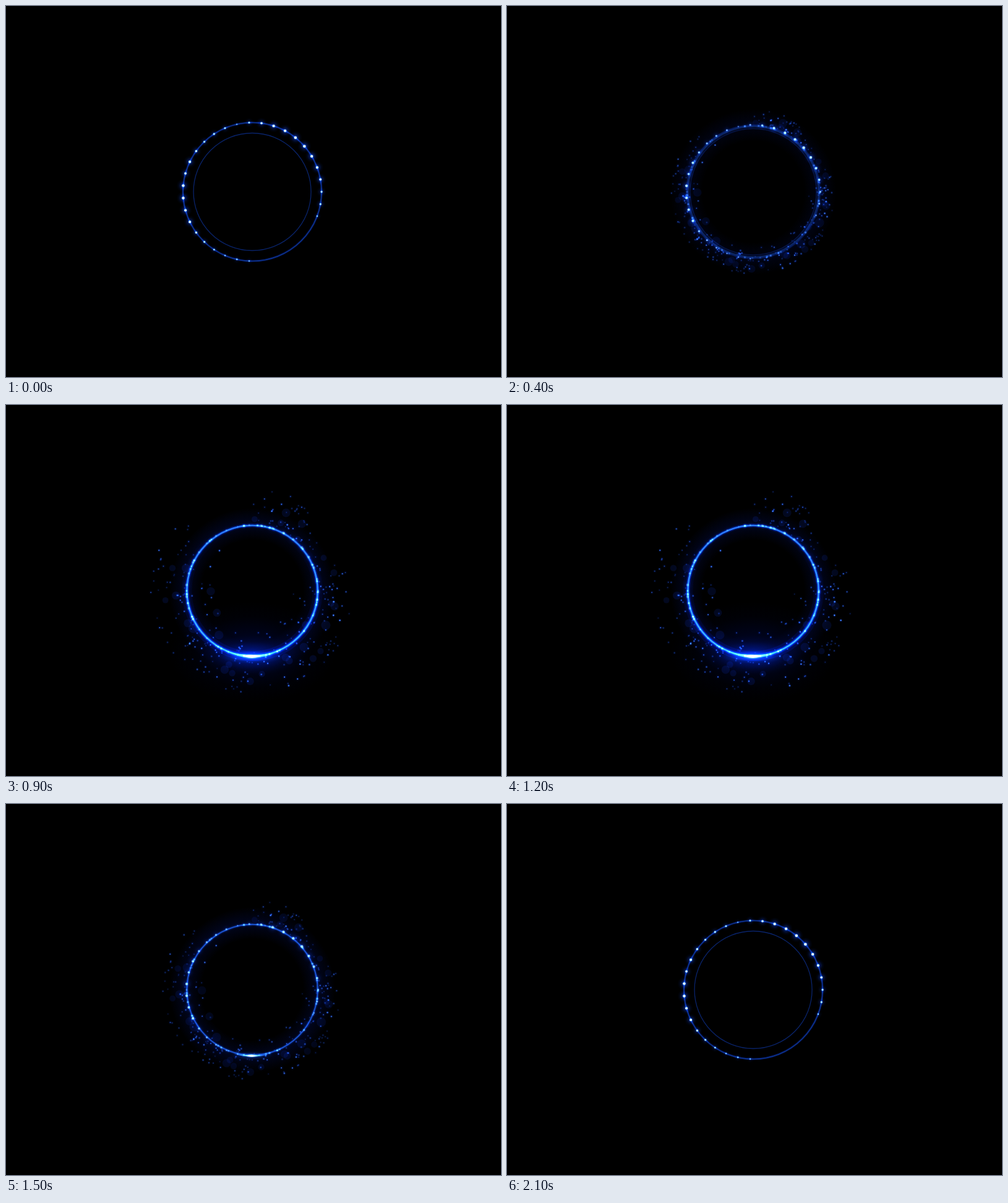
Write an HTML page with a canvas that moves like this. It is 800 px wide and 600 px high and loops after 2200 ms.

```html
<!DOCTYPE html>
<html lang="en">
<head>
<meta charset="utf-8">
<title>Particle ring</title>
<style>
  html, body { margin: 0; width: 100%; height: 100%; overflow: hidden; background: #000; }
  canvas { display: block; width: 800px; height: 600px; }
</style>
</head>
<body>
<canvas id="stage" width="800" height="600"></canvas>
<script>
const ctx = document.getElementById('stage').getContext('2d');
const CX = 398, CY = 300.5, RADIUS = 105.7, TAU = Math.PI * 2;
const STEP = 100, STEPS = 22, TOP_LEVEL = 9;

let seed = 41;
const random = () => (seed = (seed * 16807) % 2147483647) / 2147483647;
const between = (a, b) => mix(a, b, random());
const times = (n, make) => Array.from({ length: n }, (_, i) => make(i));
const clamp = v => Math.max(0, Math.min(1, v));
const mix = (a, b, t) => a + (b - a) * t;
const rgba = (rgb, a) => `rgba(${rgb},${a})`;

// Angles run clockwise from the top, in degrees
function polar(deg, r) {
  const a = deg * TAU / 360;
  return [CX + Math.sin(a) * r, CY - Math.cos(a) * r];
}

// Evenly spaced stars, brightest at the upper right and on the left
const STARS = times(35, k => ({
  deg: -2.6 + k * 360 / 35,
  power: .5 + .4 * Math.cos((k - 4.5) * TAU / 22) + between(-.12, .12)
})).filter(star => star.power > .2);

const SPARKS = times(40, () => ({ deg: between(0, 360), power: between(.4, 1) }));

// Particles gather in loose clumps around the ring
const CLUMPS = [28, 95, 138, 185, 230, 282];
function particle(i) {
  const deg = CLUMPS[i % CLUMPS.length] + (random() + random() - 1) * 40;
  const inward = deg > 65 && random() < .2;
  const reach = random() ** 1.3;
  return {
    deg,
    end: inward ? 102 - reach * 36 : 109 + reach * 56,
    power: .2 + .8 * random() ** 2,
    size: between(.8, 1.4)
  };
}
const DUST = times(270, particle);
const DISCS = times(30, particle);

function spot(x, y, r, rgb, alpha) {
  const g = ctx.createRadialGradient(x, y, 0, x, y, r);
  g.addColorStop(0, rgba(rgb, alpha));
  g.addColorStop(.4, rgba(rgb, alpha * .45));
  g.addColorStop(.7, rgba(rgb, alpha * .12));
  g.addColorStop(1, rgba(rgb, 0));
  ctx.fillStyle = g;
  ctx.fillRect(x - r, y - r, r * 2, r * 2);
}

function oval(x, y, rx, ry, rgb, alpha) {
  ctx.save();
  ctx.translate(x, y);
  ctx.scale(1, ry / rx);
  spot(0, 0, rx, rgb, alpha);
  ctx.restore();
}

function dot(x, y, r, color) {
  ctx.fillStyle = color;
  ctx.beginPath();
  ctx.arc(x, y, r, 0, TAU);
  ctx.fill();
}

function ring(r, width, style) {
  ctx.lineWidth = width;
  ctx.strokeStyle = style;
  ctx.beginPath();
  ctx.arc(CX, CY, r, 0, TAU);
  ctx.stroke();
}

// Soft band around the ring, fading to both sides
function haze(r, width, rgb, alpha) {
  const g = ctx.createRadialGradient(CX, CY, r - width, CX, CY, r + width);
  g.addColorStop(0, rgba(rgb, 0));
  g.addColorStop(.5, rgba(rgb, alpha));
  g.addColorStop(1, rgba(rgb, 0));
  dot(CX, CY, r + width, g);
}

function vertical(rgb, top, bottom) {
  const g = ctx.createLinearGradient(0, CY - RADIUS, 0, CY + RADIUS);
  g.addColorStop(0, rgba(rgb, top));
  g.addColorStop(.5, rgba(rgb, mix(top, bottom, .4)));
  g.addColorStop(1, rgba(rgb, bottom));
  return g;
}

function drawRings(merge, glow) {
  const apart = 1 - merge;
  ring(mix(112, RADIUS, merge), 4, rgba('4,24,110', .35 * apart));
  ring(mix(112, RADIUS, merge), 1.6, rgba('16,64,165', .7 * apart));
  ring(mix(95, RADIUS, merge), 1.3, rgba('12,48,150', .7 * mix(apart, 1, .3)));
  ring(RADIUS, 5, rgba('5,26,85', .5 * merge));
  ring(RADIUS, 2, rgba('30,82,160', .7 * merge ** 2));

  haze(108, 26, '2,10,60', .5 * merge);
  ring(RADIUS, 16, vertical('0,20,170', 0, .25 * glow));
  ring(RADIUS, 8, vertical('0,40,210', .1 * glow, .35 * glow));
  ring(RADIUS, 4.5, vertical('5,60,220', .25 * glow, .6 * glow));
  ring(RADIUS, 2.2, vertical('50,100,170', .35 * glow, .9 * glow));
}

function drawStars(merge, glow) {
  const fade = mix(1, .55, merge) * (1 - glow * .7);
  for (const { deg, power } of STARS) {
    const [x, y] = polar(deg, mix(112, 106.5, merge));
    spot(x, y, 5 + power * 6, '10,55,200', power * .75 * fade);
    spot(x, y, 2 + power * 2, '90,165,255', mix(.5, 1, power) * fade);
    dot(x, y, .6 + power * 1.5, rgba('205,232,255', mix(.2, 1, power) * fade));
  }
}

function drawSparks(merge, glow) {
  for (const { deg, power } of SPARKS) {
    const [x, y] = polar(deg, mix(109, 106, merge));
    const alpha = power * merge * mix(.55, 1, glow);
    spot(x, y, 5, '20,85,230', alpha * .7);
    dot(x, y, 1 + power * .6, rgba('125,195,255', alpha * .85));
  }
}

function drawParticles(spread, shown) {
  for (const { deg, end, power } of DISCS) {
    const [x, y] = polar(deg, mix(108, end, spread));
    dot(x, y, 4 + power * 4, rgba('5,22,90', shown * .4));
  }
  for (const { deg, end, power, size } of DUST) {
    const [x, y] = polar(deg, mix(108, end, spread));
    const tint = `${20 + 60 * power},${65 + 85 * power},${190 + 60 * power}`;
    spot(x, y, 4, '0,30,160', shown * power * .6);
    dot(x, y, size, rgba(tint, shown * mix(.25, .9, power)));
  }
}

function drawFlare(glow) {
  const size = mix(.65, 1, glow), half = 46 * size;
  oval(397, 400, 135, 82, '0,14,120', .5 * glow);
  oval(397, 405, 84, 32, '0,45,220', .5 * glow);
  oval(397, 407, 54 * size, 12 * size, '20,95,240', mix(.6, .8, glow));

  const sweep = Math.asin(half / 107);
  const shade = ctx.createLinearGradient(397 - half, 0, 397 + half, 0);
  shade.addColorStop(0, 'rgba(50,140,255,0)');
  shade.addColorStop(.28, 'rgba(80,170,255,.7)');
  shade.addColorStop(.5, 'rgba(225,250,255,1)');
  shade.addColorStop(.72, 'rgba(80,170,255,.7)');
  shade.addColorStop(1, 'rgba(50,140,255,0)');
  ctx.fillStyle = shade;
  ctx.beginPath();
  ctx.arc(CX, CY + 1, 107, TAU / 4 + sweep, TAU / 4 - sweep, true);
  ctx.quadraticCurveTo(CX, CY + 109, CX - half, CY + Math.sqrt(107 ** 2 - half ** 2));
  ctx.fill();
  oval(397, 407, 17 * size, 5 * size, '220,245,255', 1);
}

function draw(tick) {
  // Out and back, pausing once on the way and at both ends
  const turn = Math.min(tick, STEPS - 1 - tick);
  const level = turn > 5 ? turn - 1 : turn;
  const spread = 1 - (1 - (level / TOP_LEVEL) ** 2.5) ** 4;
  const merge = clamp(spread / .65);
  const glow = clamp((level - 5) / 3.5);
  const shown = clamp(level / 4) * mix(.7, .9, glow);

  ctx.globalCompositeOperation = 'source-over';
  ctx.fillStyle = '#000';
  ctx.fillRect(0, 0, 800, 600);
  ctx.globalCompositeOperation = 'lighter';
  drawRings(merge, glow);
  drawParticles(spread, shown);
  drawStars(merge, glow);
  drawSparks(merge, glow);
  if (level >= 5) drawFlare(glow);
}

const start = performance.now();
let last = -1;
function frame() {
  const tick = Math.floor((performance.now() - start) / STEP) % STEPS;
  if (tick !== last) draw(last = tick);
  requestAnimationFrame(frame);
}
frame();
</script>
</body>
</html>
```
